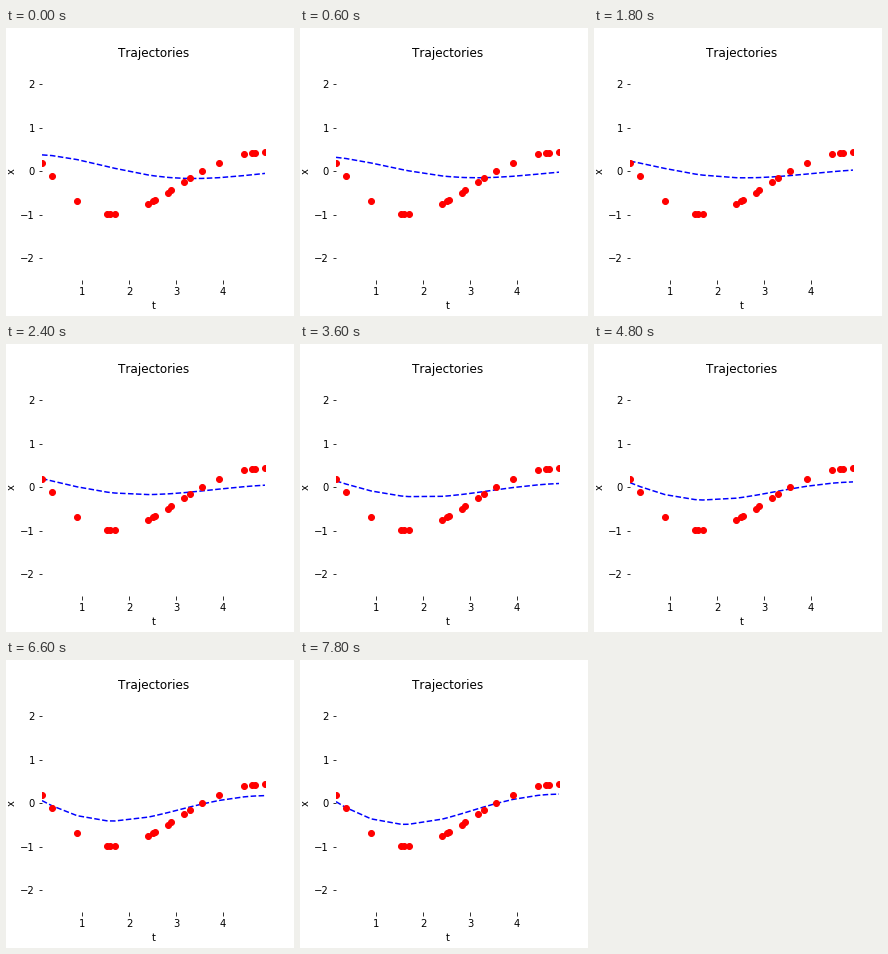
A matplotlib script for the animation above (8000 ms loop, 288 by 288 pixels).

```python
import numpy as np
import matplotlib.pyplot as plt
from matplotlib.animation import FuncAnimation

INTERVAL = 200
FRAMES = 40
FRAMES_PER_STEP = 3  # the curve updates every 600 ms

# Irregular observation times
t = np.array([0.147, 0.36, 0.895, 1.53, 1.595, 1.70, 2.41, 2.515, 2.56, 2.83,
              2.90, 3.18, 3.30, 3.555, 3.915, 4.45, 4.62, 4.68, 4.90])


def oscillator(cos_amp, sin_amp, decay, freq):
    wave = cos_amp * np.cos(freq * t) + sin_amp * np.sin(freq * t)
    return np.exp(-decay * t) * wave


def fit_at(step):
    # The cosine part settles early while the sine part keeps growing
    cos_amp = 0.12 + 0.26 * np.exp(-step / 5)
    sin_amp = 0.011 - 0.057 * step + 0.096 * np.exp(-step / 2.5)
    return oscillator(cos_amp, sin_amp, 0.245, 0.932)


plt.rcParams["font.family"] = "DejaVu Sans"
plt.rcParams["text.kerning_factor"] = 6
fig = plt.figure(figsize=(4, 4), dpi=72, facecolor="white")
fig.subplots_adjust(left=0.125, right=0.9, bottom=0.125, top=0.88)
ax = fig.add_subplot(frameon=False)
ax.set_title("Trajectories")
ax.set_xlabel("t")
ax.set_ylabel("x")

curve, = ax.plot(t, fit_at(0), "b--")
ax.plot(t, oscillator(0.4056, -1.4742, 0.246, 0.959), "ro")

ax.set_xlim(t[0], t[-1])
ax.set_ylim(-2.5, 2.5)
ax.set_xticks(range(1, 5))
ax.set_yticks(range(-2, 3))


def update(frame):
    curve.set_ydata(fit_at(frame // FRAMES_PER_STEP))
    return curve,


anim = FuncAnimation(fig, update, frames=FRAMES, interval=INTERVAL,
                     repeat=True, repeat_delay=0)
plt.show()
```
